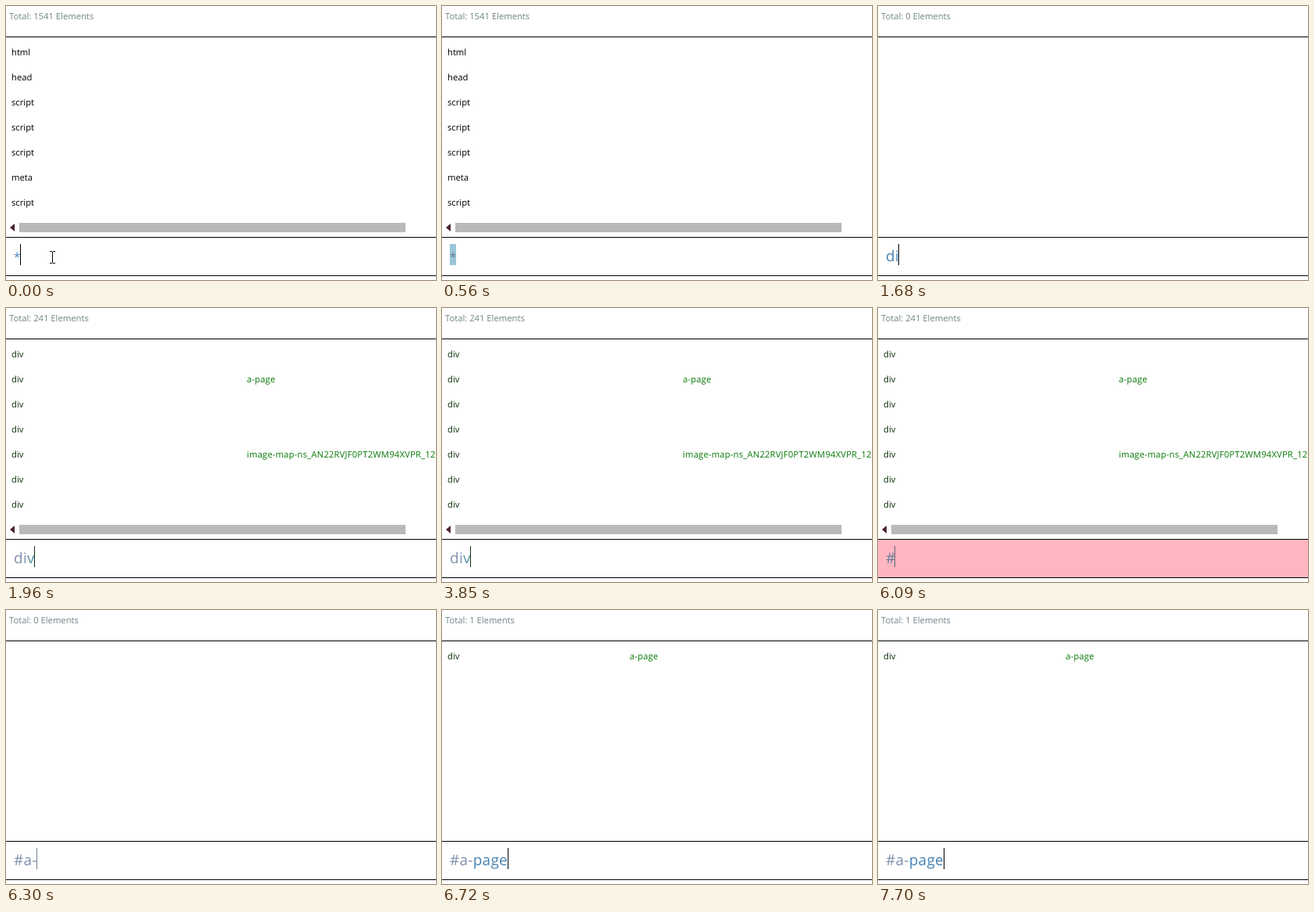
An HTML page that plays this animation: 550x350 px, repeating every 8000 ms.

```html
<!DOCTYPE html>
<html lang="en">
<head>
<meta charset="utf-8">
<title>Selector search</title>
<style>
html, body { margin: 0; width: 100%; height: 100%; overflow: hidden; background: #fff; }
svg { display: block; font: 11.24px "Open Sans", "Noto Sans", sans-serif; text-rendering: geometricPrecision; }
rect, path { shape-rendering: crispEdges; }
.id { letter-spacing: .18px; }
#input { letter-spacing: .3px; }
</style>
</head>
<body>
<svg width="550" height="350" viewBox="0 0 550 350">
  <text id="total" x="4" y="17" fill="#708488"></text>
  <g id="rows"></g>
  <g id="bar">
    <polygon points="5,283 11,278 11,288" fill="#4a2430"/>
    <rect x="17" y="277" width="494" height="12" fill="#b8b9b8"/>
  </g>
  <rect id="error" y="296" width="550" height="48" fill="#ffb6c1"/>
  <path d="M0 39.5H550M0 295.5H550M0 344.5H550" stroke="#000"/>
  <rect id="selection" x="10" y="304" height="27" fill="#9ac5d9"/>
  <text id="input" x="10" y="326"><tspan id="old" fill="#7f90ad"></tspan><tspan id="fresh"></tspan></text>
  <rect id="caret" y="304" width="1" height="27"/>
  <path id="mouse" d="M-3 -7.5H0M1 -7.5H4M.5 -7V7M-3 7.5H0M1 7.5H4" stroke="#000" fill="none"/>
</svg>
<script>
const LOOP = 8000, STEP = 70;
const $ = id => document.getElementById(id);
const BLUE = '#4682b4', DARK = '#0c2e08';

const lists = {
  all: { total: 1541, fill: '#000', tags: 'html head script script script meta script' },
  none: { total: 0, tags: '' },
  div: { total: 241, fill: DARK, tags: 'div div div div div div div', idX: 308,
         ids: { 1: 'a-page', 4: 'image-map-ns_AN22RVJF0PT2WM94XVPR_12' } },
  page: { total: 1, fill: DARK, tags: 'div', idX: 240, ids: { 0: 'a-page' } }
};

// at, list, older letters, newest letters, text colour, caret x, caret colour, selected width
const states = [
  [0, 'all', '', '*', BLUE, 18, '#000', 0],
  [560, 'all', '', '*', '#6b7c88', 0, '', 8],
  [1680, 'none', '', 'di', BLUE, 26, '#000', 0],
  [1960, 'div', 'di', 'v', '#5c8fa6', 36, DARK, 0],
  [5110, 'div', '', 'div', BLUE, 0, '', 26],
  [6090, 'div', '', '#', '#607c9c', 21, '#5c6478', 0],
  [6300, 'none', '#a-', '', BLUE, 39, '#708090', 0],
  [6440, 'none', '#a-', 'p', BLUE, 51, '#000', 0],
  [6510, 'none', '#a-', 'pa', BLUE, 61, '#000', 0],
  [6650, 'none', '#a-', 'pag', BLUE, 73, '#000', 0],
  [6720, 'page', '#a-', 'page', BLUE, 84, '#000', 0]
];
const blinks = [2450, 2940, 3360, 3850, 4340, 4830, 7210, 7700];

const show = (id, on) => $(id).setAttribute('visibility', on ? 'visible' : 'hidden');
const set = (id, attrs) => {
  for (const key in attrs) $(id).setAttribute(key, attrs[key]);
};

function drawList({ total, fill, tags, idX, ids = {} }) {
  $('total').textContent = `Total: ${total} Elements`;
  $('rows').innerHTML = tags && tags.split(' ').map((tag, i) => {
    const y = 63 + 32 * i;
    const id = ids[i] ? `<text class="id" x="${idX}" y="${y}" fill="#087808">${ids[i]}</text>` : '';
    return `<text x="7" y="${y}" fill="${fill}">${tag}</text>` + id;
  }).join('');
  show('bar', total > 1);
}

let shown;
function draw(now) {
  const t = now % LOOP;
  const [at, list, old, fresh, fill, caretX, caretFill, width] = states.findLast(s => s[0] <= t);
  if (list !== shown) drawList(lists[shown = list]);

  // The pointer drags left across the asterisk, then leaves the stage.
  const step = Math.floor(t / STEP);
  const dragging = step < 8;
  const mouseX = 59 - 8 * step;
  const selected = dragging && mouseX < 14 ? 8 : width;
  show('mouse', dragging);
  set('mouse', { transform: `translate(${mouseX} ${321 + Math.min(step, 8)})` });

  $('old').textContent = old;
  $('fresh').textContent = fresh;
  set('fresh', { fill: selected && at === 0 ? '#6b7c88' : fill });
  set('input', { 'font-size': fresh === '*' ? 15 : 18.9 });
  set('selection', { width: selected });
  show('error', fresh === '#');

  const blinkedOff = blinks.filter(b => b <= t).length % 2;
  show('caret', !selected && !blinkedOff);
  set('caret', { x: caretX, fill: caretFill || 'none' });
}

const start = performance.now();
function tick() {
  draw(performance.now() - start);
  requestAnimationFrame(tick);
}
tick();
</script>
</body>
</html>
```
